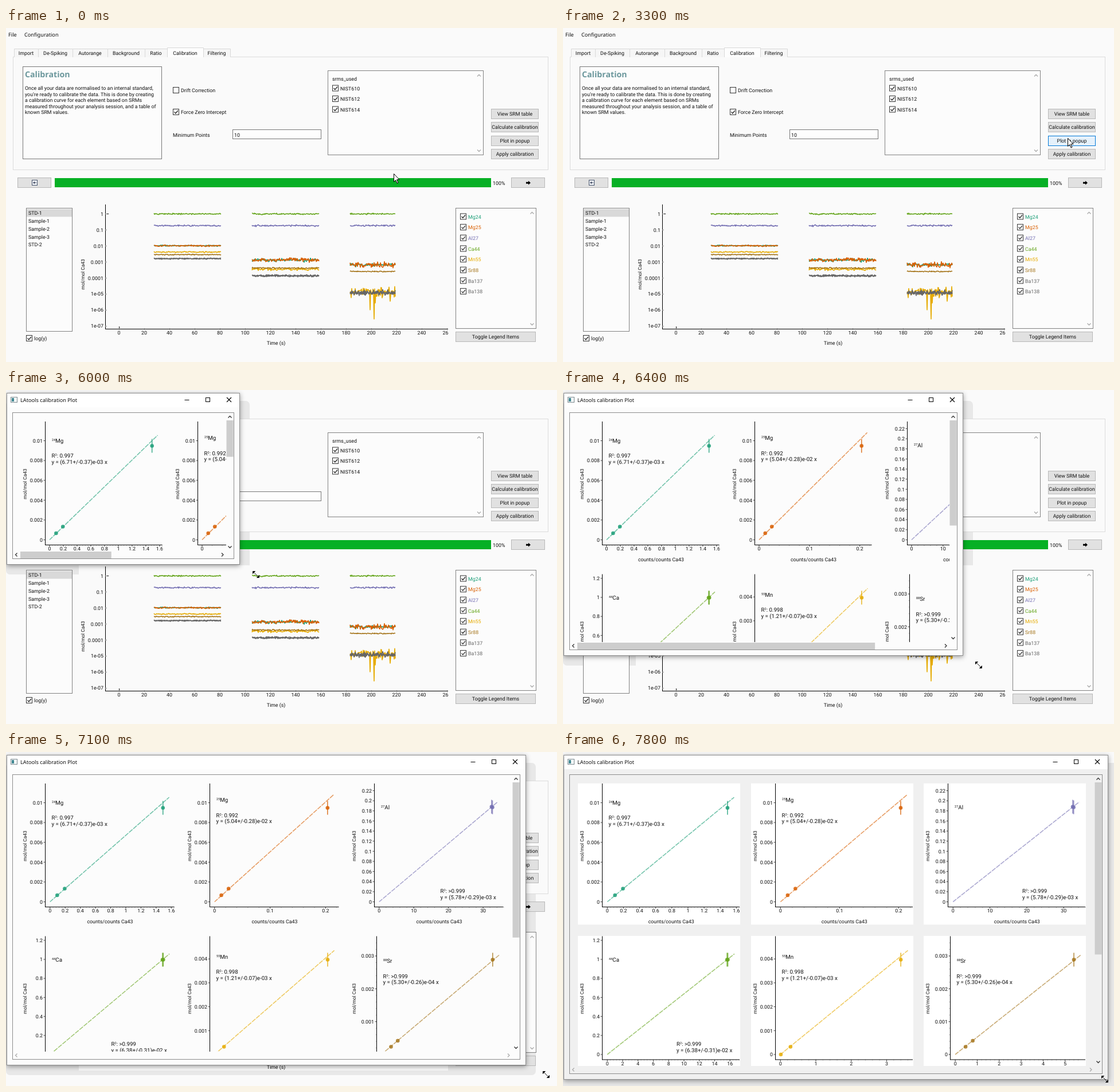
Write an HTML page that moves like this. It is 961 px wide and 583 px high and loops after 8 s.

```html
<!DOCTYPE html>
<html lang="en">
<head>
<meta charset="utf-8">
<title>Calibration</title>
<style>
html, body { margin: 0; width: 100%; height: 100%; overflow: hidden; background: #fafafa; }
svg { display: block; }
text { font: 8.85px Roboto, "Liberation Sans", sans-serif; fill: #111; text-rendering: geometricPrecision; white-space: pre; }
.mid { text-anchor: middle; }
.end { text-anchor: end; }
.sys { font: 9.2px "Noto Sans", "Open Sans", sans-serif; }
.head { font: bold 14.2px "Noto Sans", sans-serif; fill: #6b979c; }
.eq { font-size: 9.7px; }
.name { font-size: 9.8px; }
.axis { font-size: 8.4px; }
.sup { font-size: 5.6px; }
.frame { filter: drop-shadow(0 2px 4px rgba(0, 0, 0, .4)); }
</style>
</head>
<body>
<svg id="stage" width="961" height="583" viewBox="0 0 961 583">
  <rect width="961" height="583" fill="#fafafa"/>
  <g id="shade"></g>
  <g id="main"></g>
  <g id="hover"></g>
  <g id="popup"></g>
  <g id="cursor"></g>
</svg>
<script>
const LOOP = 8000, STEP = 100;
const $ = id => document.getElementById(id);
const range = n => [...Array(n).keys()];
const join = (list, fn) => list.map(fn).join('');

// Drawing helpers; text is placed by its vertical centre
const rect = (x, y, w, h, fill, stroke = 'none', more = '') =>
  `<rect x="${x}" y="${y}" width="${w}" height="${h}" fill="${fill}" stroke="${stroke}" ${more}/>`;
const line = (x1, y1, x2, y2, stroke = '#000', more = '') =>
  `<path d="M${x1} ${y1}L${x2} ${y2}" stroke="${stroke}" fill="none" ${more}/>`;
const text = (x, y, s, cls = '', more = '') =>
  `<text x="${x}" y="${y + 3.2}" class="${cls}" ${more}>${s}</text>`;
const upright = (x, y, s) => text(0, 0, s, 'mid axis', `transform="translate(${x} ${y}) rotate(-90)"`);
const chevron = (x, y, turn, color = '#333') =>
  `<path d="M-3 1.5L0-1.5L3 1.5" transform="translate(${x} ${y}) rotate(${turn})" fill="none" stroke="${color}" stroke-width="1.3"/>`;
const check = (x, y, on) => rect(x + .5, y - 4.5, 10, 10, '#fff', '#333') +
  (on ? `<path d="M${x + 2.5} ${y + .5}l2.3 2.5l4.2-5" fill="none" stroke="#222" stroke-width="1.2"/>` : '');
const button = (x, y, w, label, fill = '#e1e1e1', stroke = '#b8b8b8') =>
  rect(x, y, w, 17, fill, stroke) + text(x + w / 2, y + 8.5, label, 'mid');

const TEAL = '#1b9e77', ORANGE = '#d95f02', VIOLET = '#7570b3', GREEN = '#66a61e',
      YELLOW = '#e6ab02', BROWN = '#a6761d', GREY = '#666';

function random(seed) {
  return () => (seed = (seed * 16807) % 2147483647) / 2147483647;
}

// colour, then level and noise for each of the three time windows
const SERIES = [
  [TEAL, 380, .8, 405, 2, 413.5, 2.2],
  [ORANGE, 380, 1, 405, 2.8, 413.5, 3.2],
  [VIOLET, 345, .9, 345, 1, 345, 1],
  [GREEN, 324.5, .8, 324.5, .9, 324.5, .9],
  [YELLOW, 391, .8, 421, 1.6, 460, 7],
  [BROWN, 395.5, .7, 419, .9, 425, .7],
  [GREY, 402.5, .8, 432.5, 1.4, 462, 3.2],
  [GREY, 402.5, .8, 432, 1.4, 462.5, 3.2]
];
const WINDOWS = [[258, 375], [429, 546], [600, 679]];
const DIPS = { 635: 492, 642: 508, 644: 480, 670: 477, 656: 471 };

function trace([color, ...levels], index) {
  const rnd = random(977 + index * 131);
  const d = join(WINDOWS, ([from, to], k) => join(range(to - from + 1), i => {
    const x = from + i, noise = (rnd() + rnd() + rnd() - 1.5) * 1.3;
    let y = levels[2 * k] + noise * levels[2 * k + 1];
    if (color === YELLOW && DIPS[x]) y = DIPS[x];
    return `${i ? 'L' : 'M'}${x} ${y.toFixed(1)}`;
  }));
  return `<path d="${d}" fill="none" stroke="${color}" stroke-width="1.6" stroke-linejoin="round"/>`;
}

function timePlot() {
  const yNames = ['1', '0.1', '0.01', '0.001', '0.0001', '1e-05', '1e-06', '1e-07'];
  return rect(127, 306, 644, 250, '#fafafa') +
    line(173.5, 308, 173.5, 526) + line(173, 525.5, 771, 525.5) +
    line(173, 324.5, 179, 324.5) + line(197.5, 521, 197.5, 527) +
    join(yNames, (s, i) => text(170, 324.7 + 27.9 * i, s, 'end') +
      line(173, 324.5 + 28 * i, 176, 324.5 + 28 * i, '#999')) +
    `<svg x="173" y="524" width="598" height="16">` +
    join(range(14), i => text(24 + 44 * i, 7.5, 20 * i, 'mid') + line(24.5 + 44 * i, 0, 24.5 + 44 * i, 3, '#777')) +
    '</svg>' + text(471, 550, 'Time (s)', 'mid') + upright(134, 430, 'mol/mol Ca43') +
    join(SERIES, trace);
}

function mainWindow() {
  const tabs = [['Import', 14, 56], ['De-Spiking', 56, 116], ['Autorange', 116, 177], ['Background', 177, 242],
    ['Ratio', 242, 281], ['Filtering', 344, 391], ['Calibration', 281, 344]];
  const info = ['Once all your data are normalised to an internal standard,',
    'you’re ready to calibrate the data. This is done by creating', 'a calibration curve for each element based on SRMs',
    'measured throughout your analysis session, and a table of', 'known SRM values.'];
  const legend = ['Mg24', 'Mg25', 'Al27', 'Ca44', 'Mn55', 'Sr88', 'Ba137', 'Ba138'];
  return text(4, 11.5, 'File', 'sys') + text(32, 11.5, 'Configuration', 'sys') +
    rect(12.5, 50.5, 933, 197, '#fafafa', '#dcdcdc') +
    join(tabs, ([s, a, b], i) => {
      const top = i === 6 ? 34.5 : 36.5;
      return `<path d="M${a + .5} 51V${top}H${b + .5}V51" fill="${i === 6 ? '#fdfdfd' : '#f6f6f6'}" stroke="#d9d9d9"/>` +
        text((a + b) / 2, i === 6 ? 43.3 : 44.2, s, 'mid');
    }) +
    rect(29.5, 67.5, 242, 161, '#fcfcfc', '#777') +
    text(33, 82.6, 'Calibration', 'head') +
    join(info, (s, i) => text(33, 105 + 10.5 * i, s)) +
    check(291, 108, false) + text(305, 108.5, 'Drift Correction') +
    check(291, 146, true) + text(305, 146.5, 'Force Zero Intercept') +
    text(291, 186.3, 'Minimum Points') + rect(395.5, 177.5, 154, 16, '#fdfdfd', '#777') + text(398, 186.5, '10') +
    rect(561.5, 74.5, 271, 147, '#fcfcfc', '#828282') + text(569, 88.5, 'srms_used') +
    join(['NIST610', 'NIST612', 'NIST614'], (s, i) => check(569, 104.5 + 18.5 * i, true) + text(583, 105.5 + 18.5 * i, s)) +
    chevron(825, 83, 0, '#aaa') + chevron(825, 214, 180, '#aaa') +
    button(846.5, 141.5, 82, 'View SRM table') + button(846.5, 164.5, 82, 'Calculate calibration') +
    button(846.5, 188.5, 82, 'Plot in popup') + button(846.5, 211.5, 82, 'Apply calibration') +
    button(20.5, 261.5, 58, '') + rect(45.5, 265.5, 9, 9, '#f2f6fa', '#45526a') +
    '<path d="M47 270l3-2.2v1.6h3v1.2h-3v1.6z" fill="#333c55"/>' +
    rect(85, 262, 761, 16, '#06b025') + text(849, 270.5, '100%') +
    button(881.5, 261.5, 58, '') + '<path d="M907 268.8h4v-2l4 3.5l-4 3.5v-2h-4z" fill="#000"/>' +
    rect(35.5, 314.5, 80, 215, '#fcfcfc', '#828282') + rect(36, 316, 79, 13.5, '#d9d9d9') +
    join(['STD-1', 'Sample-1', 'Sample-2', 'Sample-3', 'STD-2'], (s, i) => text(39, 323 + 13.8 * i, s)) +
    check(35, 541, true) + text(49, 541.7, 'log(y)') +
    timePlot() +
    rect(784.5, 314.5, 140, 210, '#fcfcfc', '#828282') +
    join(legend, (s, i) => check(792, 328.5 + 18.65 * i, true) +
      text(806, 329.6 + 18.65 * i, s, '', `style="fill:${SERIES[i][0]}"`)) +
    chevron(917.5, 323, 0, '#aaa') + chevron(917.5, 517, 180, '#aaa') +
    button(784.5, 530.5, 139, 'Toggle Legend Items');
}

// kx: share of plot width per unit, ky: pixels per unit, xt/yt: tick step and count, xEnd: end of the fitted line
const PLOTS = [
  { mass: 24, el: 'Mg', color: TEAL, kx: .585, ky: 17300, xt: [.2, 8], yt: [.002, 5], xEnd: 1.572, slope: 6.71e-3,
    nameY: 34.5, eqY: 60.5, r2: '0.997', fit: '6.71+/-0.37)e-03', pts: [[.095, 195.5], [.194, 184], [1.49, 43]] },
  { mass: 25, el: 'Mg', color: ORANGE, kx: 4.285, ky: 17300, xt: [.1, 2], yt: [.002, 5], xEnd: .2147, slope: 5.04e-2,
    nameY: 29.5, eqY: 56, r2: '0.992', fit: '5.04+/-0.28)e-02', pts: [[.0122, 195.5], [.0253, 184], [.2035, 43]] },
  { mass: 27, el: 'Al', color: VIOLET, kx: .02675, ky: 882, xt: [10, 3], yt: [.02, 11], xEnd: 34.2, slope: 5.78e-3,
    nameY: 42.5, eqY: 188.5, right: true, r2: '&gt;0.999', fit: '5.78+/-0.29)e-03', pts: [[32.45, 41], [32.7, 42]] },
  { mass: 44, el: 'Ca', color: GREEN, kx: .0556, ky: 166, xt: [2, 8], yt: [.2, 6], xEnd: 16.58, slope: 6.38e-2,
    nameY: 42, eqY: 189, right: true, r2: '&gt;0.999', fit: '6.38+/-0.31)e-02', pts: [[15.62, 41.5], [15.72, 41.5]] },
  { mass: 55, el: 'Mn', color: YELLOW, kx: .2567, ky: 41700, xt: [1, 3], yt: [.001, 4], xEnd: 3.6, slope: 1.21e-3,
    nameY: 37, eqY: 63, r2: '0.998', fit: '1.21+/-0.07)e-03', pts: [[.01, 207], [.284, 193.5], [3.4, 41.5]] },
  { mass: 88, el: 'Sr', color: BROWN, kx: .162, ky: 57333, xt: [1, 5], yt: [.001, 3], xEnd: 5.71, slope: 5.3e-4, inset: 4,
    nameY: 43.5, eqY: 70.5, r2: '&gt;0.999', fit: '5.30+/-0.26)e-04', pts: [[.47, 193.5], [.797, 183], [5.4, 41.5]] }
];

function calibrationPlot(p, i, pitch, fill) {
  const w = pitch - 18.5, inset = p.inset || 0, ax = 42.5 + inset, pw = w - ax, y0 = 207, base = 216;
  const px = v => +(ax + .0365 * pw + v * p.kx * pw).toFixed(2), py = v => y0 - v * p.ky;
  const [xs, xn] = p.xt, [ys, yn] = p.yt, num = v => +v.toFixed(4);
  const eqX = p.right ? w - 111 : ax + 11;
  const sup = s => `<tspan class="sup" dy="-3">${s}</tspan><tspan dy="3">`;
  return `<svg x="${Math.round(14 + (i % 3) * pitch)}" y="${14.5 + Math.floor(i / 3) * 266.5}" width="${w}" height="247">` +
    rect(0, 0, w, 247, fill) +
    join(range(xn * 5 + 4), k => line(px(k * xs / 5), base, px(k * xs / 5), base + 1.5, '#bbb')) +
    join(range(xn + 1), k => line(px(k * xs), base, px(k * xs), base + 3, '#555') + text(px(k * xs), 222.7, num(k * xs), 'mid')) +
    (inset ? join(range(18), k => line(ax - 2, py(k * ys / 5), ax, py(k * ys / 5), '#bbb')) : '') +
    join(range(yn + 1), k => line(ax - 3, py(k * ys), ax, py(k * ys), '#555') + text(ax - 4.5, py(k * ys), num(k * ys), 'end')) +
    line(ax, 0.5, ax, base + .5) + line(ax, base, w - 1, base) +
    line(px(0), y0, px(p.xEnd), py(p.xEnd * p.slope), p.color,
      'stroke-width="1.6" stroke-dasharray="8.1 1.6" stroke-dashoffset=".8" opacity=".6"') +
    join(p.pts, ([x, y]) => (y < 60 ? line(px(x), y - 12, px(x), y + 12, p.color, 'stroke-width="1.6" opacity=".8"') : '') +
      `<circle cx="${px(x)}" cy="${y}" r="3.3" fill="${p.color}" opacity=".85"/>`) +
    text(ax + 11.5, p.nameY, `${sup(p.mass)}${p.el}</tspan>`, 'name') +
    text(eqX, p.eqY, `R${sup(2)}: ${p.r2}</tspan>`, 'eq') + text(eqX, p.eqY + 10.5, `y = (${p.fit} x`, 'eq') +
    upright(6.5, 109.5, 'mol/mol Ca43') + text((ax + w) / 2, 241.3, 'counts/counts Ca43', 'mid') + '</svg>';
}

// Piecewise linear lookup: rows of [key, ...values]
function at(rows, k) {
  const i = rows.findIndex(r => r[0] > k);
  if (i < 0) return rows[rows.length - 1].slice(1);
  if (i === 0) return rows[0].slice(1);
  const a = rows[i - 1], b = rows[i], f = (k - a[0]) / (b[0] - a[0]);
  return a.slice(1).map((v, j) => v + (b[j + 1] - v) * f);
}

const PITCH = [[847, 266], [907, 287], [951, 301.5]];

function popup(W, H, late) {
  const body = late ? '#f0f0f0' : '#fcfcfc', vw = W - 36, vh = H - 64;
  const [pitch] = at(PITCH, W), idle = vw >= 811;
  return rect(1.5, 5.5, W - 2, H - 6, body, '#8c8c8c', 'class="frame"') + rect(2, 6, W - 3, 24, '#fff') +
    rect(8.5, 12.5, 11, 9, '#f4f7f8', '#7d8a90') + rect(10, 14, 4, 6, '#3f8791') +
    text(25, 17.4, 'LAtools calibration Plot', 'sys') +
    line(W - 96.5, 17.5, W - 88.5, 17.5) + rect(W - 59.5, 13.5, 7, 7, 'none', '#000') +
    `<path d="M${W - 23} 13l8 8m0-8l-8 8" stroke="#000" stroke-width="1.1"/>` +
    rect(11.5, 39.5, W - 22, H - 50, body, '#8c8c8c') +
    `<svg x="12" y="40" width="${vw}" height="${vh}">` +
    join(PLOTS, (p, i) => calibrationPlot(p, i, pitch, late ? '#fff' : body)) + '</svg>' +
    rect(W - 23.5, 53, 12, (H - 90) * vh / 815, '#cdcdcd') +
    chevron(W - 17.5, 47, 0) + chevron(W - 17.5, H - 31, 180) +
    (idle ? '' : rect(25, H - 23, (W - 62) * vw / 811, 12, '#cdcdcd')) +
    chevron(18, H - 17.5, -90, idle ? '#aaa' : '#333') + chevron(W - 30.5, H - 17.5, 90, idle ? '#aaa' : '#333');
}

const SIZE = [[5900, 398, 301], [6000, 408, 305], [6400, 698, 464], [6800, 888, 524], [6900, 900, 540],
  [7000, 900, 540], [7100, 907, 547], [7300, 930, 560], [7800, 951, 572]];
const PATH = [[0, 676, 254], [200, 687, 247], [300, 687, 247], [500, 692, 240], [2100, 692, 240], [2200, 738, 232],
  [2400, 789, 220], [2500, 789, 220], [2600, 830, 216], [3000, 880, 192], [4300, 880, 192], [4400, 824, 189],
  [4600, 670, 127], [4800, 520, 185], [5000, 410, 275], [5100, 420, 295], [5200, 420, 295], [5400, 404, 299],
  [5500, 404, 299], [5600, 397, 302], [5900, 397, 302], [6000, 436, 322], [6400, 725, 480], [6800, 908, 534],
  [6900, 914, 552], [7000, 914, 552], [7100, 942, 563], [7300, 950, 570], [7800, 945, 571]];
const ARROW = '<path d="M.5.5V14.5L3.7 11.5L6 17L8 16.1L5.7 10.7H10Z" fill="#fff" stroke="#000"/>';
const RESIZE = '<path d="M-5.5-5.5H-1.5L-5.5-1.5ZM5.5 5.5H1.5L5.5 1.5ZM-4-4L4 4" fill="#000" stroke="#000" stroke-width=".9"/>';

$('main').innerHTML = mainWindow();
let last = -1;

function draw(t) {
  if (t === last) return;
  last = t;
  const [x, y] = at(PATH, t), [W, H] = at(SIZE, t).map(Math.round);
  const open = t >= 3700, full = t >= 3900, pressed = t === 3200;
  $('hover').innerHTML = t >= 2800 && t < 4500
    ? button(846.5, 188.5, 82, 'Plot in popup', pressed ? '#cce4f7' : '#e5f1fb', pressed ? '#005499' : '#0078d7') : '';
  $('shade').innerHTML = full ? rect(0, 19, W + 17, H - 2, '#e8e8e8', 'none', 'rx="7"') : '';
  $('popup').innerHTML = open ? popup(W, H, t >= 7800) : '';
  const scale = full ? 1 : .92 + (t - 3700) / 2500;
  $('popup').setAttribute('transform', `translate(199 153) scale(${scale}) translate(-199 -153)`);
  $('popup').setAttribute('opacity', full ? 1 : .4 + (t - 3700) / 300);
  $('cursor').innerHTML = t >= 5600 ? RESIZE : ARROW;
  $('cursor').setAttribute('transform', `translate(${Math.round(x)} ${Math.round(y)})`);
}

function tick() {
  draw(Math.floor((performance.now() % LOOP) / STEP) * STEP);
  requestAnimationFrame(tick);
}
tick();
</script>
</body>
</html>
```
